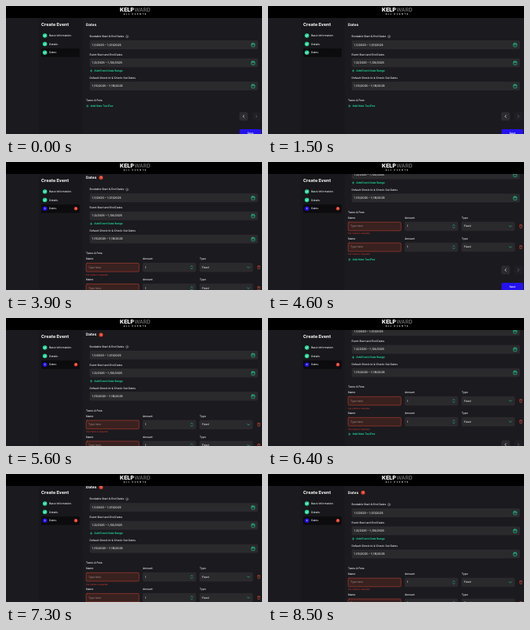
Animation, 320 px wide and 160 px high, one loop 8600 ms. Source, as an HTML page with a canvas:

```html
<!DOCTYPE html>
<html lang="en">
<head>
<meta charset="utf-8">
<title>Create Event</title>
<style>
  html, body { margin: 0; width: 100%; height: 100%; overflow: hidden; background: #18171c; }
  canvas { display: block; width: 320px; height: 160px; }
</style>
</head>
<body>
<canvas id="stage"></canvas>
<script>
const W = 320, H = 160, LOOP = 8600, TICK = 100;
const canvas = document.getElementById('stage');
const ctx = canvas.getContext('2d');
const ratio = window.devicePixelRatio || 1;
canvas.width = W * ratio;
canvas.height = H * ratio;
ctx.scale(ratio, ratio);
ctx.textBaseline = 'middle';
ctx.textRendering = 'geometricPrecision';

const GREEN = '#1fd495', RED = '#e5402f', BLUE = '#2412ee', WHITE = '#f2f2f4';
const ROW_TOP = 125, ROW_GAP = 26, MAX_SCROLL = 55;

// start, ticks, direction (1 down, 0 up), easing power
const SCROLLS = [
  [3900, 3, 1, 2.45],
  [4800, 4, 0, 1.9],
  [5500, 3, 1, 8],
  [6400, 4, 0, 1.9],
  [6800, 3, 1, 2.45],
  [7200, 3, 0, 1.9]
];

function scrollAt(t) {
  let y = 0;
  for (const [start, ticks, down, power] of SCROLLS) {
    if (t < start) break;
    const p = Math.min(1, ((t - start) / TICK + 1) / ticks);
    y = MAX_SCROLL * Math.pow(down ? p : 1 - p, power);
  }
  return y;
}

function fadeAt(t, start) {
  return t < start ? 0 : Math.min(1, 0.6 + (t - start) / 300);
}

function text(str, x, y, size = 3.3, color = WHITE, weight = 500, align = 'left') {
  ctx.font = `${weight} ${size}px Inter, "Open Sans", sans-serif`;
  ctx.fillStyle = color;
  ctx.textAlign = align;
  ctx.fillText(str, x, y);
}

function box(x, y, w, h, r, fill, stroke, line = 0.5) {
  ctx.beginPath();
  ctx.roundRect(x, y, w, h, r);
  if (fill) { ctx.fillStyle = fill; ctx.fill(); }
  if (stroke) { ctx.strokeStyle = stroke; ctx.lineWidth = line; ctx.stroke(); }
}

function disc(x, y, r, color) {
  ctx.beginPath();
  ctx.arc(x, y, r, 0, Math.PI * 2);
  ctx.fillStyle = color;
  ctx.fill();
}

function path(points, color, line = 0.6) {
  ctx.beginPath();
  points.forEach(([x, y], i) => i ? ctx.lineTo(x, y) : ctx.moveTo(x, y));
  ctx.strokeStyle = color;
  ctx.lineWidth = line;
  ctx.lineCap = ctx.lineJoin = 'round';
  ctx.stroke();
}

function badge(x, y, r, alpha) {
  ctx.globalAlpha = alpha;
  disc(x, y, r, RED);
  text('1', x, y + 0.1, 2.8, '#fff', 500, 'center');
  ctx.globalAlpha = 1;
}

function check(x, y) {
  disc(x, y, 2.75, GREEN);
  path([[x - 1.2, y + 0.1], [x - 0.3, y + 1], [x + 1.3, y - 0.9]], '#fff', 0.7);
}

function addLink(label, x, y) {
  path([[x - 1.2, y], [x + 1.2, y]], GREEN, 0.6);
  path([[x, y - 1.2], [x, y + 1.2]], GREEN, 0.6);
  text(label, x + 3.8, y, 3.3, GREEN, 700);
}

function dateField(label, value, y) {
  text(label, 104.5, y);
  box(105, y + 5.3, 209.5, 10, 1.2, '#2a292c', '#343337');
  text(value, 107.3, y + 10.4, 3.55);
  const cx = 308.9, cy = y + 10.5;
  box(cx - 2, cy - 1.8, 4, 4.1, 0.6, null, GREEN, 0.6);
  path([[cx - 2, cy - 0.4], [cx + 2, cy - 0.4]], GREEN);
  path([[cx - 0.9, cy - 2.4], [cx - 0.9, cy - 1.5]], GREEN);
  path([[cx + 0.9, cy - 2.4], [cx + 0.9, cy - 1.5]], GREEN);
}

function trash(x, y) {
  const color = '#cf4a2f';
  path([[x - 1.6, y - 1.4], [x + 1.6, y - 1.4]], color);
  path([[x - 0.7, y - 2], [x + 0.7, y - 2]], color);
  path([[x - 1.2, y - 1.3], [x - 1.1, y + 1.9], [x + 1.1, y + 1.9], [x + 1.2, y - 1.3]], color);
}

function taxRow(y, alpha) {
  const top = y + 5.2, mid = y + 10.5;
  text('Name', 100, y);
  text('Amount', 171, y);
  text('Type', 242, y);
  for (const x of [100, 171, 242]) box(x + 0.2, top, 66, 10.6, 1.2, '#2a292c', '#343337');

  ctx.globalAlpha = alpha;
  box(100.2, top, 66, 10.6, 1.2, '#39211f', '#b23a2c', 0.6);
  text('Tax name is required.', 100, y + 19.6, 2.75, RED, 400);
  ctx.globalAlpha = 1;

  text('Type here', 103, mid, 3.3, '#94827f');
  text('1', 173.7, mid);
  path([[231, mid - 1], [232.2, mid - 2.2], [233.4, mid - 1]], GREEN, 0.6);
  path([[231, mid + 1], [232.2, mid + 2.2], [233.4, mid + 1]], GREEN, 0.6);
  text('Fixed', 245, mid);
  path([[301.5, mid - 0.8], [303, mid + 0.7], [304.5, mid - 0.8]], GREEN, 0.6);
  trash(316, mid);
}

function footer(y) {
  box(292, y + 8, 10, 10, 1.5, '#2c2b30', '#323136');
  path([[297.6, y + 11.5], [296.2, y + 13], [297.6, y + 14.5]], '#fff', 0.6);
  box(308, y + 8, 10, 10, 1.5, '#201f24', '#242328');
  path([[312.4, y + 11.5], [313.8, y + 13], [312.4, y + 14.5]], '#77767c', 0.6);
  box(292, y + 29, 27, 10.2, 1.4, BLUE);
  text('Save', 305.5, y + 34.2, 3.2, '#fff', 600, 'center');
}

function sidebar(alert) {
  ctx.fillStyle = '#1b1a1f';
  ctx.fillRect(0, 15, 41, H);
  ctx.fillStyle = '#18171b';
  ctx.fillRect(41, 15, 55, H);
  text('Create Event', 44, 23, 5.5, '#fff', 700);
  box(44, 53, 48, 10.7, 1.2, '#0c0b0e');
  ['Basic Information', 'Details', 'Dates'].forEach((name, i) => {
    const y = 36.9 + i * 10.7;
    if (i === 2 && alert) {
      disc(48.6, y, 2.75, BLUE);
      text('3', 48.6, y + 0.1, 2.8, '#fff', 500, 'center');
      badge(87.3, y, 2.2, alert);
    } else {
      check(48.6, y);
    }
    text(name, 54, y, 3.3);
  });
}

function header() {
  ctx.fillStyle = '#000';
  ctx.fillRect(0, 0, W, 15);
  text('KELP', 160, 5.3, 6.9, '#fff', 800, 'right');
  text('WARD', 160.5, 5.3, 6.7, '#77777a', 500);
  ctx.letterSpacing = '1.2px';
  text('ALL EVENTS', 161.5, 10.4, 2.9, '#d8d8da', 600, 'center');
  ctx.letterSpacing = '0px';
}

function content(t, alert) {
  const rows = [2300, 3500].filter(start => t >= start);
  ctx.save();
  ctx.translate(0, -scrollAt(t));
  text('Dates', 100, 23.2, 4.65, '#fff', 700);
  if (alert) badge(118.8, 23.2, 2.5, alert);

  dateField('Bookable Start & End Dates', '1 /1/2025 – 1 /31/2025', 38.2);
  ctx.beginPath();
  ctx.arc(151.3, 38.2, 1.5, 0, Math.PI * 2);
  ctx.strokeStyle = '#c8c8cc';
  ctx.lineWidth = 0.4;
  ctx.stroke();
  path([[151.3, 38], [151.3, 38.9]], '#c8c8cc', 0.4);

  dateField('Event Start and End Dates', '1 /2/2025 – 1 /30/2025', 60.7);
  addLink('Add Event Date Range', 106.5, 81);
  dateField('Default Check-In & Check-Out Dates', '1 /15/2025 – 1 /18/2025', 89.7);

  text('Taxes & Fees', 100, 117.7);
  rows.forEach((start, i) => taxRow(ROW_TOP + i * ROW_GAP, fadeAt(t, start)));
  const end = ROW_TOP + rows.length * ROW_GAP;
  addLink('Add New Tax/Fee', 101.8, end);
  footer(end);
  ctx.restore();
}

function draw(t) {
  const alert = fadeAt(t, 2300);
  ctx.fillStyle = '#1b1a1f';
  ctx.fillRect(0, 0, W, H);
  content(t, alert);
  sidebar(alert);
  header();
}

const began = performance.now();
function loop() {
  const t = (performance.now() - began) % LOOP;
  draw(Math.floor(t / TICK) * TICK);
  requestAnimationFrame(loop);
}
loop();
</script>
</body>
</html>
```
